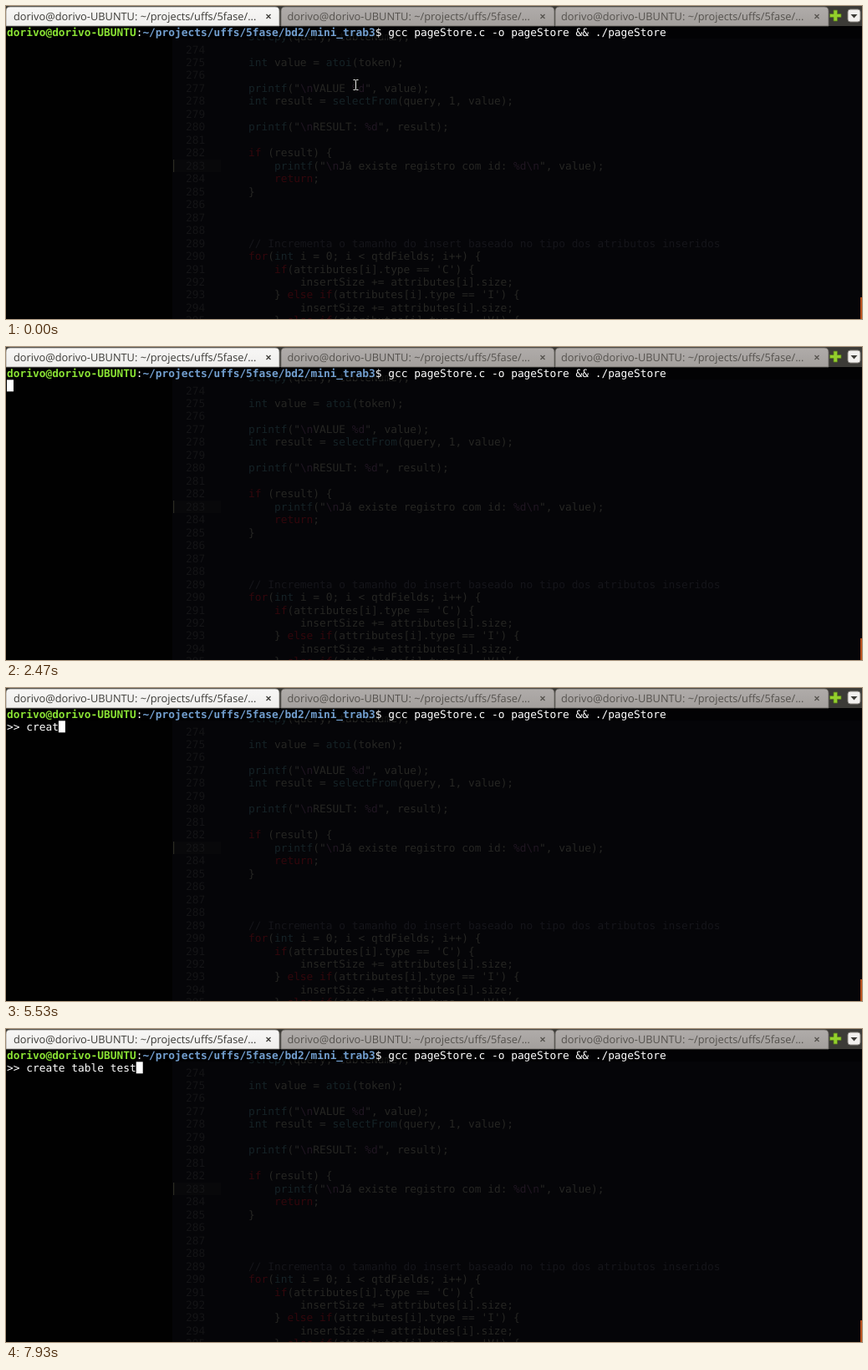
An HTML page for the animation above (8 s loop, 1024 by 375 pixels).

```html
<!DOCTYPE html>
<html lang="pt">
<head>
<meta charset="utf-8">
<title>Terminal session</title>
<style>
  html, body { margin: 0; width: 100%; height: 100%; overflow: hidden; background: #010101; }
  svg { display: block; width: 100vw; height: 100vh; }
  text { white-space: pre; text-rendering: geometricPrecision; }
  .mono { font: 12.85px "DejaVu Sans Mono", monospace; }
  .tab { font: 12.8px "Open Sans", "Noto Sans", sans-serif; }
  .bold { font-weight: bold; }
</style>
</head>
<body>
<svg id="stage" viewBox="0 0 1024 375" preserveAspectRatio="none">
  <defs>
    <linearGradient id="active" x2="0" y2="1">
      <stop offset="0" stop-color="#f8f7f6"/>
      <stop offset="1" stop-color="#efeeec"/>
    </linearGradient>
    <linearGradient id="idle" x2="0" y2="1">
      <stop offset="0" stop-color="#b0acaa"/>
      <stop offset="1" stop-color="#a39f9c"/>
    </linearGradient>
  </defs>
  <rect width="1024" height="375" fill="#010101"/>
  <rect x="199" y="24" width="825" height="351" fill="#050508"/>
  <g id="code"></g>
  <rect y="24" width="1024" height="15" fill="#010101" opacity=".5"/>
  <g id="tabs"><rect width="1024" height="24" fill="#3c3b37"/></g>
  <g id="buttons">
    <path d="M990 5h4.5v4.5h4.5v4h-4.5v4.500h-4.500v-4.500h-4.500v-4h4.500z" fill="#93cf2c" stroke="#587c1c" stroke-width=".8"/>
    <rect x="1007" y="4" width="15" height="15" rx="3" fill="#f2f0ee" stroke="#85827d"/>
    <path d="M1010.500 10h8l-4 4.500z" fill="#3c3b37"/>
  </g>
  <rect x="1022" y="349" width="2" height="26" fill="#b9501c"/>
  <g id="shell"></g>
  <rect id="caret" width="8" height="14" fill="#fff"/>
  <g id="mouse" fill="none">
    <path id="beam" d="M-3-6h2q1 0 1 1q0-1 1-1h2M0-5v10M-3 6h2q1 0 1-1q0 1 1 1h2" stroke="#000" stroke-width="3"/>
    <path d="M-3-6h2q1 0 1 1q0-1 1-1h2M0-5v10M-3 6h2q1 0 1-1q0 1 1 1h2" stroke="#f0f0f0"/>
  </g>
</svg>
<script>
const LOOP = 8000, LEFT = 1, CHAR = 7.736, ROW = 15.47;
const USER = "dorivo", HOST = USER + "-UBUNTU", DIR = "~/projects/uffs/5fase";
const COMMAND = "gcc pageStore.c -o pageStore && ./pageStore";
const ENTER = 2400, READY = 2800, BLINK = 600;
const WORDS = "create table test";
const KEYS = [4930, 5130, 5270, 5400, 5530, 5670, 5870, 6130, 6270, 6400,
              6530, 6670, 6800, 6900, 7270, 7500, 7700];

const $ = id => document.getElementById(id);

function add(parent, name, attrs, content) {
  const node = document.createElementNS("http://www.w3.org/2000/svg", name);
  for (const key in attrs) node.setAttribute(key, attrs[key]);
  if (content) node.textContent = content;
  parent.append(node);
  return node;
}

const column = n => LEFT + n * CHAR;

// Editor showing through the translucent terminal: [line, indent, code]
const lines = [
  [273, 0, "strcpy(query, tableName);"],
  [275, 0, "int value = atoi(token);"],
  [277, 0, 'printf("\\nVALUE %d", value);'],
  [278, 0, "int result = selectFrom(query, 1, value);"],
  [280, 0, 'printf("\\nRESULT: %d", result);'],
  [282, 0, "if (result) {"],
  [283, 1, 'printf("\\nJá existe registro com id: %d\\n", value);'],
  [284, 1, "return;"],
  [285, 0, "}"],
  [289, 0, "// Incrementa o tamanho do insert baseado no tipo dos atributos inseridos"],
  [290, 0, "for(int i = 0; i < qtdFields; i++) {"],
  [291, 1, "if(attributes[i].type == 'C') {"],
  [292, 2, "insertSize += attributes[i].size;"],
  [293, 1, "} else if(attributes[i].type == 'I') {"],
  [294, 2, "insertSize += attributes[i].size;"],
  [295, 1, "} else if(attributes[i].type == 'V') {"]
];

function tint(token) {
  if (/^\/\//.test(token)) return "#15151a";
  if (/^(if|else|for|return)$/.test(token)) return "#32070c";
  if (/^(%d|\\n)$/.test(token)) return "#201622";
  if (/^(int|printf|atoi|selectFrom|strcpy)$/.test(token)) return "#152226";
  return "#262623";
}

function drawCode() {
  const code = $("code");
  const baseline = n => 72 + (n - 275) * ROW;
  add(code, "rect", { x: 200, y: 184, width: 57, height: 15, fill: "#08080a" });
  add(code, "rect", { x: 200, y: 184, width: 1.2, height: 15, fill: "#2b2b22" });
  for (let n = 274; n <= 295; n++)
    add(code, "text", { x: 215, y: baseline(n), class: "mono", fill: "#141416" }, String(n));
  for (const [n, indent, source] of lines) {
    const row = add(code, "text", { x: 290 + indent * 4 * CHAR, y: baseline(n), class: "mono" });
    for (const token of source.match(/\/\/.*|%d|\\n|[A-Za-zá]+|[^A-Za-zá%\\]+/g))
      add(row, "tspan", { fill: tint(token) }, token);
  }
}

function drawTabs() {
  const tabs = $("tabs");
  for (let i = 0; i < 3; i++) {
    const x = i * 328 + (i ? 1 : 0), first = i === 0;
    add(tabs, "path", {
      d: `M${x} 24V6q0-5 5-5H${x + 322}q5 0 5 5V24z`,
      fill: first ? "url(#active)" : "url(#idle)",
      stroke: first ? "#8a8782" : "#6b6863", "stroke-width": .8
    });
    const ink = first ? "#3c3b37" : "#55524e";
    add(tabs, "text", { x: 9 + i * 327.5, y: 17, class: "tab", fill: ink },
      `${USER}@${HOST}: ${DIR}/...`);
    const cx = 314 + i * 328;
    add(tabs, "path", {
      d: `M${cx - 2.5} 10l5 5m0-5l-5 5`, stroke: ink, "stroke-width": 1.3
    });
  }
}

const path = DIR + "/bd2/mini_trab3";
const promptEnd = `${USER}@${HOST}:${path}$ ${COMMAND}`.length;

function drawPrompt() {
  const row = add($("shell"), "text", { x: LEFT, y: 36, class: "mono" });
  const part = (text, fill, bold) => add(row, "tspan", { fill, class: bold ? "bold" : "" }, text);
  part(`${USER}@${HOST}`, "#8ae234", true);
  part(":", "#fff");
  part(path, "#729fcf", true);
  part("$ " + COMMAND, "#fff");
}

drawCode();
drawTabs();
drawPrompt();
const input = add($("shell"), "text", { x: LEFT, y: 51, class: "mono", fill: "#fff" });

const ease = p => p * p * (3 - 2 * p);

function render(t) {
  const entered = t >= ENTER;
  const count = KEYS.filter(key => key <= t).length;
  const typed = t >= READY ? ">> " + WORDS.slice(0, count) : "";
  input.textContent = typed;

  // The caret restarts its blink at each output or key press.
  const last = count ? KEYS[count - 1] : t >= READY ? READY : entered ? ENTER : 200 - 2 * BLINK;
  const lit = (t - last) % (2 * BLINK) < BLINK;
  const caret = $("caret");
  caret.setAttribute("x", column(entered ? typed.length : promptEnd));
  caret.setAttribute("y", entered ? 39.3 : 24.5);
  caret.setAttribute("visibility", lit ? "visible" : "hidden");

  const p = ease(Math.min(1, Math.max(0, (t - 70) / 800)));
  const mouse = $("mouse");
  mouse.setAttribute("transform", `translate(${418.5 + 125 * p} ${94.5 + 167 * p})`);
  mouse.setAttribute("visibility", entered ? "hidden" : "visible");
}

const start = performance.now();
function tick() {
  render((performance.now() - start) % LOOP);
  requestAnimationFrame(tick);
}
tick();
</script>
</body>
</html>
```
